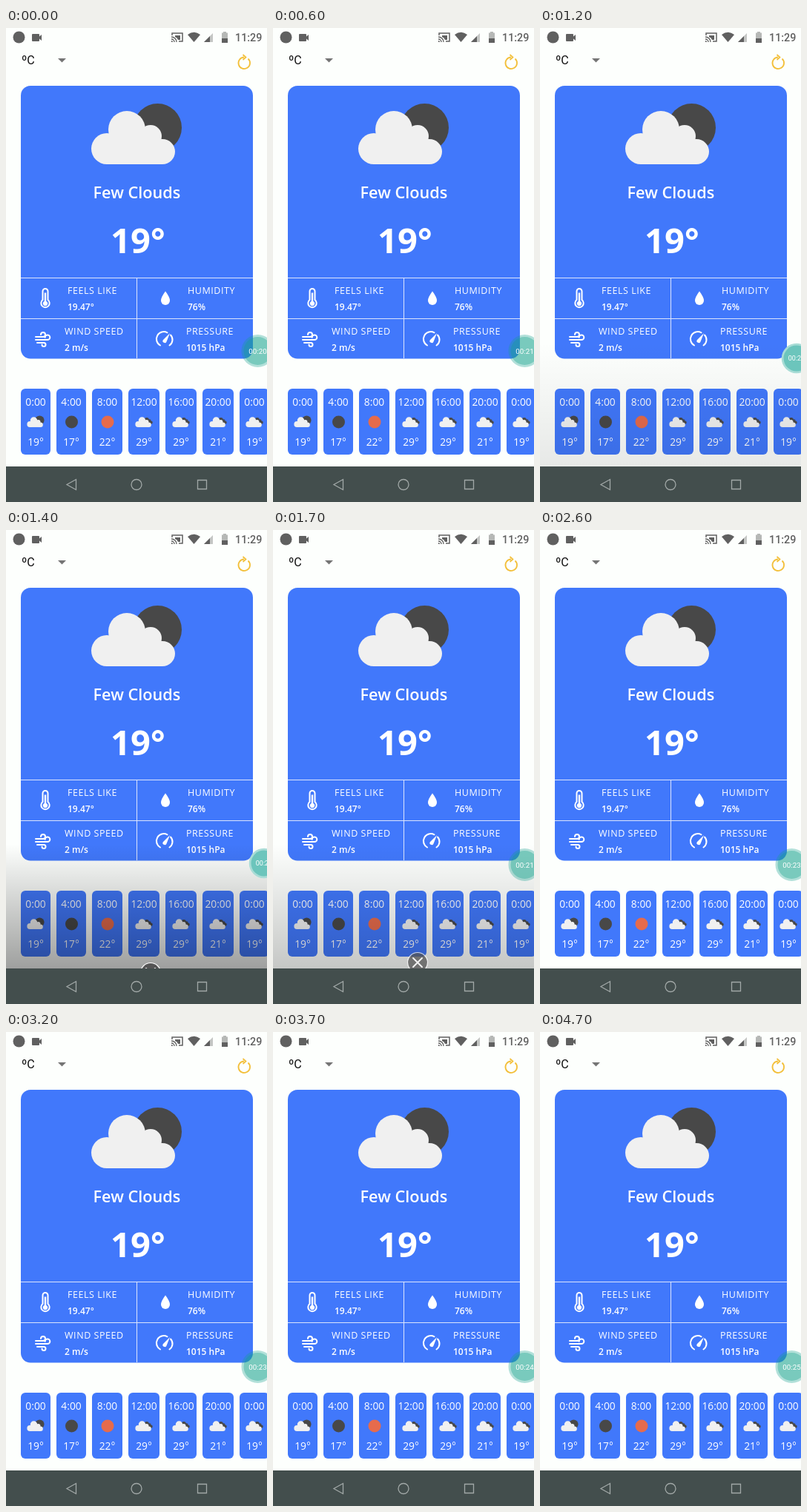
Animation of 352x640 px, one loop 5300 ms. Source, as an HTML page:

```html
<!DOCTYPE html>
<html lang="en">
<head>
<meta charset="utf-8">
<title>Weather</title>
<style>
html, body { margin: 0; width: 100%; height: 100%; overflow: hidden; background: #fdfffd; }
svg { display: block; width: 352px; height: 640px; font-family: "Open Sans", "Noto Sans", sans-serif; fill: #fff; }
.mid { text-anchor: middle; }
.bold { font-weight: 600; }
.label { font-size: 12.5px; letter-spacing: .55px; }
.value { font-size: 12px; font-weight: 600; }
.hour { font-size: 13.8px; text-anchor: middle; }
.sys { font-family: Roboto, sans-serif; }
.line { fill: none; stroke: #fff; stroke-width: 2; stroke-linecap: round; }
</style>
</head>
<body>
<svg viewBox="0 0 352 640">
  <defs>
    <linearGradient id="fade" x1="0" y1="0" x2="0" y2="1">
      <stop offset="0" stop-opacity="0"/>
      <stop offset="1" stop-opacity=".44"/>
    </linearGradient>
    <clipPath id="page"><path d="M0 0H352V592H0Z"/></clipPath>
    <g id="cloud">
      <circle cx="136" cy="163" r="21"/><circle cx="163" cy="137" r="25"/>
      <circle cx="195" cy="146" r="15"/><circle cx="211" cy="167" r="17"/>
      <path d="M136 150H211V184H136Z"/>
    </g>
    <g id="few">
      <circle cx="204.5" cy="134.5" r="32.5" fill="#484848"/>
      <use href="#cloud" fill="#f0f0f0"/>
    </g>
    <g id="broken">
      <use href="#cloud" fill="#484848" transform="translate(92 44) scale(.64)"/>
      <use href="#cloud" fill="#f0f0f0"/>
    </g>
  </defs>

  <!-- status bar -->
  <g fill="#606060">
    <circle cx="17.5" cy="12.5" r="8"/>
    <path d="M36 8h8q1 0 1 1v2.500l3-2.500v8l-3-2.500v2.500q0 1-1 1h-8q-1 0-1-1v-8q0-1 1-1z"/>
    <path d="M224 10V7H238V18H233" fill="none" stroke="#606060" stroke-width="1.500"/>
    <path d="M223 12a7 7 0 0 1 7 7M223 15a4 4 0 0 1 4 4" fill="none" stroke="#606060" stroke-width="1.400"/>
    <path d="M223 17a2 2 0 0 1 2 2h-2zM228 10h7v6h-3q-1-3-4-4z"/>
    <path d="M245 9Q253.500 2.500 262 9L253.500 19Z"/>
    <path d="M279 7V19H267Z" fill="#c4c6c4"/>
    <path d="M275 11V19H267Z"/>
    <path d="M293 6.500V5H297V6.500H299V20H291V6.500Z" fill="#b6b8b6"/>
    <path d="M291 14H299V20H291Z"/>
    <text class="sys" x="309" y="17.500" font-size="14.300" font-weight="500">11:29</text>
  </g>

  <!-- toolbar -->
  <text class="sys" x="21" y="49" font-size="16" fill="#111">ºC</text>
  <path d="M70 41H81L75.500 46.500Z" fill="#757575"/>
  <path d="M326.500 41.500A7.800 7.800 0 1 1 321 39.500" fill="none" stroke="#f3c03c" stroke-width="1.800"/>
  <path d="M319.500 36L323.500 39.500L319.500 43" fill="none" stroke="#f3c03c" stroke-width="1.700"/>

  <!-- current weather -->
  <rect x="20" y="78" width="313" height="368.500" rx="13" fill="#4178fb"/>
  <use href="#few"/>
  <text class="mid bold" x="176.500" y="230" font-size="21.700">Few Clouds</text>
  <text class="mid" x="178" y="304" font-size="47" font-weight="700">19°</text>
  <path d="M20 337.500H333M20 392.500H333M176.500 337V446" stroke="#dce5fd"/>

  <path class="line" d="M49.500 367V355.500a3.500 3.500 0 0 1 7 0V367a5.700 5.700 0 1 1-7 0Z"/>
  <path d="M51.800 357.500h2.400V369a3.200 3.200 0 1 1-2.400 0Z"/>
  <path d="M215 355.500Q209 363.500 209 368a6 6 0 0 0 12 0Q221 363.500 215 355.500Z"/>
  <path class="line" d="M40 417H50a3 3 0 1 0-3-3M40 421H56a3.300 3.300 0 1 0-3.300-3.300M42 425H51a2.500 2.500 0 1 1-2.500 2.500" stroke-linecap="butt"/>
  <path class="line" d="M208 428.500A9.300 9.300 0 0 1 217.500 411.300M222 414.500A9.300 9.300 0 0 1 220.500 428.500"/>
  <path d="M221 412L216.500 423.500a2.600 2.600 0 1 1-4.500-2.500Z"/>
  <g id="facts"></g>

  <g id="hours"></g>

  <!-- drag overlay -->
  <g clip-path="url(#page)">
    <rect id="shade" y="424" width="352" height="168" fill="url(#fade)"/>
    <g id="close">
      <circle r="13.500" fill="#555" stroke="#fff" stroke-width="1.200"/>
      <path class="line" d="M-6-6L6 6M6-6L-6 6"/>
    </g>
  </g>

  <!-- navigation bar -->
  <path d="M0 592H352V640H0Z" fill="#434e4d"/>
  <g fill="none" stroke="#a1a8a7" stroke-width="1.300">
    <path d="M94.500 609.500V623.500L82 616.500Z"/>
    <circle cx="176" cy="616.500" r="7"/>
    <path d="M258.500 610.500H270.500V622.500H258.500Z"/>
  </g>

  <g id="bubble">
    <circle id="rim" r="22"/>
    <circle id="core" r="19"/>
    <text id="timer" class="mid sys" y="3.500" font-size="9.800"></text>
  </g>
</svg>
<script>
const $ = id => document.getElementById(id);
const LOOP = 5300;

$("facts").innerHTML = [
  [83, 359, "FEELS LIKE", "19.47°"],
  [245, 359, "HUMIDITY", "76%"],
  [79, 414, "WIND SPEED", "2 m/s"],
  [243, 414, "PRESSURE", "1015 hPa"]
].map(([x, y, name, value]) =>
  `<text class="label" x="${x}" y="${y}">${name}</text>
   <text class="value" x="${x}" y="${y + 22}">${value}</text>`).join("");

const mini = (id, x) =>
  `<use href="#${id}" transform="translate(${x - 33.500} 504) scale(.19)"
    style="transform-box:view-box"/>`;
const disc = (x, color) => `<circle cx="${x + .5}" cy="532" r="8.500" fill="${color}"/>`;

$("hours").innerHTML = [
  [40, 40, "0:00", 19, mini("few", 40)],
  [88, 40, "4:00", 17, disc(88, "#484848")],
  [136.5, 41, "8:00", 22, disc(136.5, "#e66b4c")],
  [186, 42, "12:00", 29, mini("broken", 186)],
  [236, 42, "16:00", 29, mini("broken", 236)],
  [286, 42, "20:00", 21, mini("broken", 286)],
  [335, 40, "0:00", 19, mini("broken", 335)]
].map(([x, w, hour, temp, icon]) =>
  `<rect x="${x - w / 2}" y="487" width="${w}" height="89" rx="6" fill="#4178fb"/>
   <text class="hour" x="${x}" y="510">${hour}</text>${icon}
   <text class="hour" x="${x}" y="564">${temp}°</text>`).join("");

// Piecewise linear value through [time, value] points
function track(points, t) {
  const i = points.findIndex(p => p[0] > t);
  if (i === 0) return points[0][1];
  if (i < 0) return points[points.length - 1][1];
  const [t0, a] = points[i - 1], [t1, b] = points[i];
  return a + (b - a) * (t - t0) / (t1 - t0);
}

const bubbleX = [[1000, 339.5], [1200, 346], [1400, 348], [1500, 348], [1700, 339.5]];
const bubbleY = [[1000, 436], [1200, 446], [1400, 450], [1600, 452]];
const shade = [[1000, 0], [1200, .2], [1400, .85], [1500, 1], [1600, .9], [1700, .5], [1800, .2], [2000, 0]];
const closeY = [[1200, 620], [1400, 598], [1600, 580], [1700, 584], [1800, 592], [2000, 610]];
const ticks = [600, 1900, 2600, 3600, 4600];

function draw(now) {
  const t = Math.floor(now % LOOP / 100) * 100;
  const held = t >= 1100 && t < 1600;
  $("shade").setAttribute("opacity", track(shade, t));
  $("close").setAttribute("transform", `translate(195 ${track(closeY, t)})`);
  $("close").setAttribute("opacity", t > 1000 && t < 2000 ? (t < 1700 ? 1 : .75) : 0);
  $("bubble").setAttribute("transform",
    `translate(${track(bubbleX, t)} ${track(bubbleY, t)}) scale(${held ? .92 : 1})`);
  $("rim").setAttribute("fill", held ? "#a9dcd6" : "rgba(20,160,140,.32)");
  $("core").setAttribute("fill", held ? "#6cc5bc" : "rgba(20,160,140,.36)");
  $("timer").textContent = "00:" + (20 + ticks.filter(s => t >= s).length);
}

const start = performance.now();
(function frame() {
  draw(performance.now() - start);
  requestAnimationFrame(frame);
})();
</script>
</body>
</html>
```
